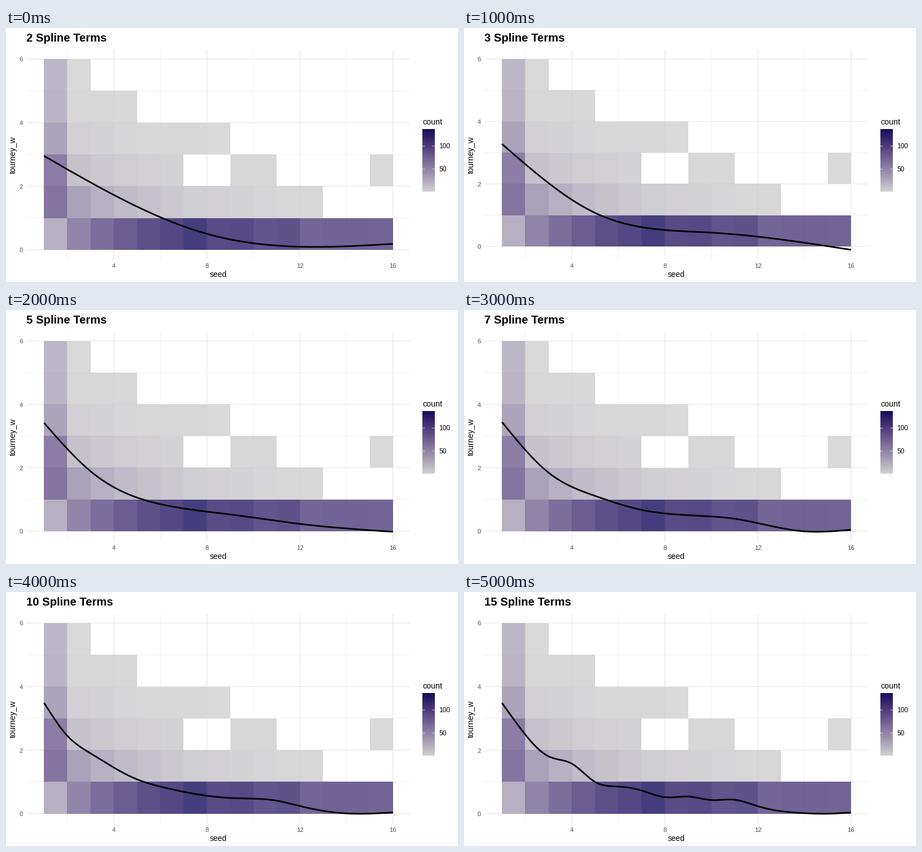
A matplotlib script that plays this animation: 800x450 px, repeating every 6 s.

```python
import numpy as np
import matplotlib.pyplot as plt
from matplotlib.animation import FuncAnimation
from matplotlib.patches import Rectangle

W, H, DPI = 800, 450, 100
PT = 72 / DPI
LEFT, RIGHT, TOP, BOTTOM = 36.2, 715.4, 38.6, 409.9
Y_MAX, Y_MIN = 55.0, 392.9  # pixel rows of the data limits
ALPHA, MAX_COUNT = 0.8, 137
GREY = "#4d4d4d"

TERMS = [2, 3, 5, 7, 10, 15]
SEEDS = np.arange(1, 17)
# The bracket grew over the years, so high seeds have played less often
TEAMS = np.repeat([148, 132, 120, 100], [8, 2, 2, 4])
MEAN_WINS = np.array([3.485, 2.49, 1.805, 1.575, 1.0, 0.855, 0.73, 0.52,
                      0.54, 0.43, 0.44, 0.233, 0.082, 0.015, 0.0, 0.04])

# Filled columns (first, last) of each row; the first column holds seeds 1 and 2
SPANS = [[(1, 15)], [(1, 12)], [(1, 6), (9, 10), (15, 15)],
         [(1, 8)], [(1, 4)], [(1, 2)]]
FAVOURITES = [84, 76, 44, 30, 28]

TO_XYZ = np.array([[0.4124, 0.3576, 0.1805],
                   [0.2126, 0.7152, 0.0722],
                   [0.0193, 0.1192, 0.9505]])
WHITE = TO_XYZ.sum(axis=1)


def to_lab(rgb):
    c = np.array(rgb) / 255
    c = np.where(c > 0.04045, ((c + 0.055) / 1.055) ** 2.4, c / 12.92)
    t = TO_XYZ @ c / WHITE
    f = np.where(t > 0.008856, np.cbrt(t), 7.787 * t + 16 / 116)
    return np.array([116 * f[1] - 16, 500 * (f[0] - f[1]), 200 * (f[1] - f[2])])


def to_rgb(lab):
    fy = (lab[0] + 16) / 116
    f = np.array([fy + lab[1] / 500, fy, fy - lab[2] / 200])
    t = np.where(f > 0.2069, f ** 3, (f - 16 / 116) / 7.787)
    c = np.clip(np.linalg.solve(TO_XYZ, t * WHITE), 0, 1)
    return np.where(c > 0.0031308, 1.055 * c ** (1 / 2.4) - 0.055, 12.92 * c)


LOW, HIGH = to_lab((208, 208, 208)), to_lab((20, 11, 92))


def shade(count):
    t = min((count - 1) / (MAX_COUNT - 1), 1)
    return to_rgb(LOW + t * (HIGH - LOW))


def tile_counts():
    """Counts as {(column, row): n}; the bottom row takes all remaining teams."""
    counts = {}
    left = TEAMS[1:].copy()
    left[0] += TEAMS[0]
    for w in range(5, -1, -1):
        for first, last in SPANS[w]:
            for col in range(first, last + 1):
                if w == 0:
                    n = left[col - 1]
                elif col == 1:
                    n = FAVOURITES[w - 1]
                else:
                    n = max(1, round(46 * 0.42 ** (w - 1) * np.exp(-0.3 * (col - 2))))
                counts[col, w] = n
                left[col - 1] -= n
    return counts


def natural_spline(k, v, x):
    h, n = np.diff(k), len(k)
    slope = np.diff(v) / h
    a, b = np.eye(n), np.zeros(n)
    for i in range(1, n - 1):
        a[i, i - 1:i + 2] = h[i - 1], 2 * (h[i - 1] + h[i]), h[i]
        b[i] = 6 * (slope[i] - slope[i - 1])
    m = np.linalg.solve(a, b)
    j = np.clip(np.searchsorted(k, x) - 1, 0, n - 2)
    p, q, w = k[j + 1] - x, x - k[j], h[j]
    return ((m[j] * p ** 3 + m[j + 1] * q ** 3) / (6 * w)
            + (v[j] / w - m[j] * w / 6) * p
            + (v[j + 1] / w - m[j + 1] * w / 6) * q)


def fit_spline(terms, x):
    """Least-squares natural spline with its knots at the seed quantiles."""
    sample = np.repeat(SEEDS, TEAMS)
    knots = np.unique(np.quantile(sample, np.linspace(0, 1, terms + 1)))
    basis = np.column_stack([natural_spline(knots, unit, SEEDS)
                             for unit in np.eye(len(knots))])
    weight = np.sqrt(TEAMS)
    values = np.linalg.lstsq(basis * weight[:, None], MEAN_WINS * weight,
                             rcond=None)[0]
    return natural_spline(knots, values, x)


def px(seed):
    return 67.3 + (seed - 1) * 41.17


COUNTS = tile_counts()
fig = plt.figure(figsize=(W / DPI, H / DPI), dpi=DPI, facecolor="white")
ax = fig.add_axes([0, 0, 1, 1])


def label(x, y, text, size, **kw):
    ax.text(x, y, text, fontsize=size * PT, family="Liberation Sans",
            va="baseline", **kw)


def line(xs, ys, color, width, z):
    ax.plot(xs, ys, color=color, lw=width * PT, zorder=z, snap=False,
            solid_capstyle="butt")


def draw_grid(py):
    for s in range(2, 17, 2):
        major = s % 4 == 0
        line([px(s)] * 2, [TOP, BOTTOM], "#ebebeb", 1.42 if major else 0.75, 1)
        if major:
            label(px(s), 425, str(s), 11.2, color=GREY, ha="center")
    for w in range(7):
        major = w % 2 == 0
        line([LEFT, RIGHT], [py(w)] * 2, "#ebebeb", 1.42 if major else 0.75, 1)
        if major:
            label(30, py(w) + 4.4, str(w), 11.2, color=GREY, ha="right")


def draw_tiles(py):
    for (col, w), n in COUNTS.items():
        ax.add_patch(Rectangle(
            (px(col), py(w)), px(col + 1) - px(col), py(w + 1) - py(w),
            fc=shade(n), alpha=ALPHA, lw=0, snap=True, zorder=2))


def draw_legend():
    label(737, 171, "count", 14.2)
    x0, x1, y0, y1 = 737, 759, 179, 290
    bar = np.array([[shade(n)] for n in np.linspace(MAX_COUNT, 1, y1 - y0)])
    ax.imshow(bar, extent=(x0, x1, y1, y0), aspect="auto", zorder=2)
    for n in (50, 100):
        y = y1 - (n - 1) * (y1 - y0) / (MAX_COUNT - 1)
        line([x0, x0 + 4.4], [y, y], "white", 0.75, 3)
        line([x1 - 4.4, x1], [y, y], "white", 0.75, 3)
        label(766, y + 4.2, str(n), 11.8)


def draw(i):
    x = np.linspace(1, 16, 240)
    fit = fit_spline(TERMS[i], x)
    low = min(0, fit.min())

    def py(wins):
        return Y_MAX + (6 - wins) * (Y_MIN - Y_MAX) / (6 - low)

    ax.clear()
    draw_grid(py)
    draw_tiles(py)
    line(px(x), py(fit), "black", 2.85, 4)
    draw_legend()
    label(36, 24.3, f"{TERMS[i]} Spline Terms", 20.3, weight="bold")
    label(376, 441, "seed", 13.9, ha="center")
    label(17, 224.5, "tourney_w", 14.2, ha="center", rotation=90,
          rotation_mode="anchor")
    ax.set(xlim=(0, W), ylim=(H, 0))
    ax.axis("off")
    return []


anim = FuncAnimation(fig, draw, frames=len(TERMS), interval=1000,
                     init_func=lambda: draw(0), repeat=True, repeat_delay=0)
plt.show()
```
